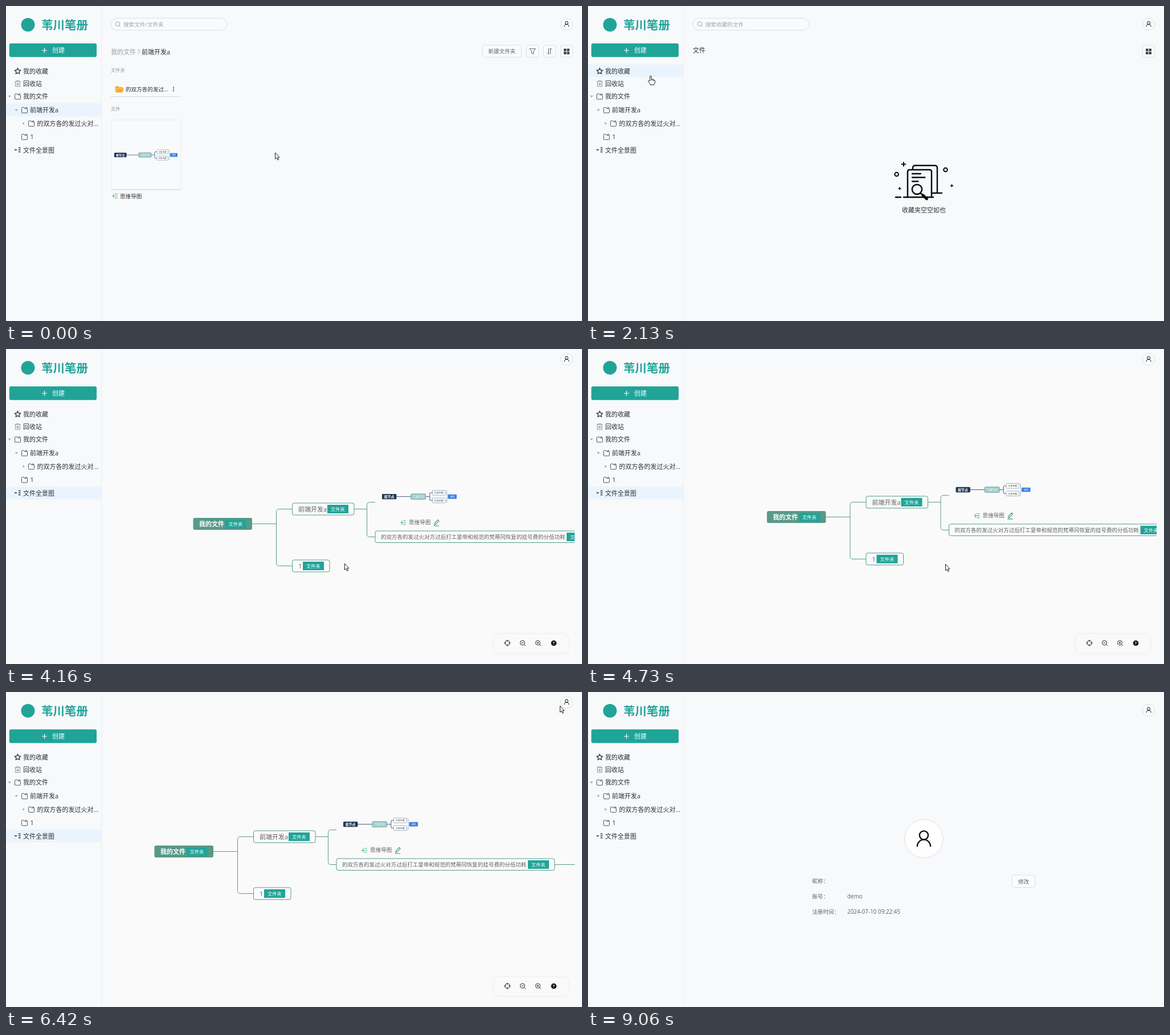
These frames come from a looping animation (1011 px wide and 554 px high, 9.72 s). An HTML page with a canvas:

```html
<!DOCTYPE html>
<html lang="zh-CN">
<head>
<meta charset="utf-8">
<title>文档管理</title>
<style>
html, body { margin: 0; width: 100%; height: 100%; overflow: hidden; background: #f7f9fb; }
canvas { display: block; width: 1011px; height: 554px; }
</style>
</head>
<body>
<canvas id="stage" width="1011" height="554"></canvas>
<script>
const g = document.getElementById('stage').getContext('2d');
const LOOP = 9720;
const BG = '#f7f9fb', TEAL = '#20a498', NODE = '#579a8a', INK = '#303133',
  MID = '#606266', PALE = '#9a9da3', EDGE = '#dcdfe6';
const FONT = '"Open Sans", "Noto Sans CJK SC", "Noto Sans CJK", sans-serif';

// Page switches
const BIN = 1230, FAV = 1990, MAP = 3370, PROFILE = 7490, LOAD = 140;

// Pointer path: time, x, y of the tip
const PATH = [
  [0, 472, 257.5], [400, 468, 255], [1080, 105, 145], [1490, 105, 145], [1710, 110, 123],
  [2440, 110, 123], [3040, 91, 244.5], [3520, 91, 244.5], [4300, 640, 389], [4670, 640, 389],
  [4730, 627, 378], [4850, 586, 367], [4990, 586, 367], [5540, 50, 161], [5710, 50, 161],
  [6250, 998, 2], [6420, 972, 24], [6670, 972, 24], [6780, 980, 17], [6930, 980, 17],
  [7320, 950, 55], [7850, 950, 55], [8120, 684, 210], [8420, 578, 262], [8800, 812, 244],
  [8920, 820, 247], [9060, 895, 495]
];
// Offset of the mind map while it is dragged
const DRAG = [[4670, 14, 12], [4730, 0, 0], [4850, -54, -15]];

const clamp = v => Math.max(0, Math.min(1, v));
const smooth = v => v * v * (3 - 2 * v);
const straight = v => v;

function along(keys, t, ease) {
  let i = 0;
  while (i < keys.length - 2 && t >= keys[i + 1][0]) i++;
  const [t0, x0, y0] = keys[i], [t1, x1, y1] = keys[i + 1];
  const k = ease(clamp((t - t0) / (t1 - t0)));
  return [x0 + (x1 - x0) * k, y0 + (y1 - y0) * k];
}

function text(s, x, cy, size = 11, color = INK, weight = 400) {
  g.font = `${weight} ${size}px ${FONT}`;
  g.fillStyle = color;
  g.fillText(s, x, cy + size * 0.38);
}

function paint(fill, stroke, lw = 1) {
  if (fill) { g.fillStyle = fill; g.fill(); }
  if (stroke) { g.strokeStyle = stroke; g.lineWidth = lw; g.stroke(); }
}

function box(x, y, w, h, r, fill, stroke, lw) {
  g.beginPath();
  g.roundRect(x, y, w, h, r);
  paint(fill, stroke, lw);
}

function disc(x, y, r, fill, stroke, lw) {
  g.beginPath();
  g.arc(x, y, r, 0, 7);
  paint(fill, stroke, lw);
}

function path(d, fill, stroke, lw, x = 0, y = 0) {
  g.save();
  g.translate(x, y);
  const p = new Path2D(d);
  if (fill) { g.fillStyle = fill; g.fill(p); }
  if (stroke) { g.strokeStyle = stroke; g.lineWidth = lw || 1; g.stroke(p); }
  g.restore();
}

const plus = (x, y, r, color, lw) => path(`M${-r} 0H${r}M0 ${-r}V${r}`, null, color, lw, x, y);
const folder = (x, y) =>
  path('M1.5 0H4.5L6 1.8H9Q10.5 1.8 10.5 3V8.5Q10.5 9.5 9.5 9.5H1.5Q.5 9.5 .5 8.5V1Q.5 0 1.5 0ZM6 1.8L7.5 0H9.5L10.3 2', null, '#4c5561', 1, x, y);
const treeIcon = (x, y) =>
  path('M0 0H10M5 -3.5H10M5 3.5H10M3.5 -3.5Q2.5 -3.5 2.5 0Q2.5 3.5 3.5 3.5', null, '#4cb97c', 1.1, x, y);

function person(x, y, k, lw) {
  disc(x, y - 6 * k, 7.6 * k, null, '#111', lw);
  g.beginPath();
  g.ellipse(x, y + 14 * k, 11.7 * k, 12.4 * k, 0, Math.PI, 2 * Math.PI);
  paint(null, '#111', lw);
}

function userButton(y) {
  disc(984, y, 10.5, '#fafbfc', EDGE);
  person(984, y - 0.3, 0.34, 1);
}

function sidebar(active) {
  path('M167.5 0V554', null, '#eceef1');
  disc(38.5, 33, 12, TEAL);
  text('苇川笔册', 62, 33.5, 20.5, TEAL, 700);
  box(5.8, 65.7, 153.3, 24.1, 3, TEAL);
  plus(67.5, 78, 4.5, '#fff', 1.2);
  text('创建', 81, 78, 11, '#fff');
  if (active) {
    g.fillStyle = '#e9f4fe';
    g.fillRect(0, active[0], 167, active[1]);
  }
  g.beginPath();
  for (let i = 0; i < 10; i++) {
    const r = i % 2 ? 2.7 : 5.4, a = (i / 5 - 0.5) * Math.PI;
    g.lineTo(20.5 + r * Math.cos(a), 114.8 + r * Math.sin(a));
  }
  g.closePath();
  paint(null, '#222', 1.2);
  path('M0 2H11M3 2V.5H8V2M1.5 2V10.5H9.5V2M4 4.5V8.5M5.5 4.5V8.5M7 4.5V8.5', null, '#8d9aa8', 1, 15, 131);
  folder(15, 154.5);
  folder(27, 178.5);
  folder(39, 202);
  folder(27, 225.5);
  path('M15 253H19M22 249.5H25.5M22 253H25.5M22 256.5H25.5', null, '#222', 1.6);
  path('M3.5 157.5H9L6.2 161ZM15.5 181.5H21L18.2 185ZM29.5 204L33 206.5L29.5 209Z', '#a8abb2');
  text('我的收藏', 30, 115);
  text('回收站', 30, 137);
  text('我的文件', 30, 159);
  text('前端开发a', 42, 183);
  text('的双方各的发过火对...', 54.5, 207);
  text('1', 42.5, 230);
  text('文件全景图', 30, 253.5);
}

function search(hint) {
  box(184.5, 21.5, 203, 21, 10.5, '#fafbfc', EDGE);
  disc(196, 31.5, 3.8, null, PALE);
  path('M198.8 34.5L200.5 36.2', null, PALE);
  text(hint, 206, 32, 9.6, '#a0a3a9');
}

function button(x, w) {
  box(x + 0.5, 69, w - 1, 21, 3, '#fafbfc', EDGE);
}

function gridButton() {
  button(973, 22);
  for (const x of [979, 984.5]) for (const y of [75, 80.5]) box(x, y, 4.5, 4.5, 0.5, '#444');
}

// Small mind map, its root at the left of (x, y)
function miniMap(x, y, k) {
  g.save();
  g.translate(x, y);
  g.scale(k, k);
  path('M21 0H43M65 0H71M75 -5.7H72Q71 -5.7 71 -4.7V4.7Q71 5.7 72 5.7H75', null, '#3f5872', 0.8);
  path('M95 -9Q96.5 -9 96.5 -7V-2L98 0L96.5 2V7Q96.5 9 95 9', null, '#7f9ccc', 0.7);
  box(0, -4, 21.5, 8, 1.2, '#1f3756');
  text('根节点', 3, 0, 5.1, '#fff', 700);
  box(43, -4, 22, 8, 1.2, '#a6d0d0', '#6f9a9c', 0.8);
  text('二级节点', 46, 0, 4, '#e9f6f6');
  for (const cy of [-5.7, 5.7]) {
    box(75, cy - 3.6, 19, 7.2, 1, '#fff', '#8fa3bd', 0.7);
    text('分支主题', 78, cy, 3.3, '#333');
  }
  box(98, -3.2, 13, 6.4, 0.8, '#3b7fe6');
  text('概要', 101.5, 0, 3.2, '#fff');
  g.restore();
}

function home() {
  search('搜索文件/文件夹');
  text('我的文件', 184, 80.5, 11, PALE);
  path('M231 76L235 80L231 84', null, PALE);
  text('前端开发a', 238, 80.5);
  button(836, 69);
  text('新建文件夹', 846.5, 79.5, 9.6, MID);
  button(913, 22);
  path('M919 75H929.5L925.8 79.5V84.5L922.5 82.8V79.5Z', null, MID);
  button(943, 22);
  path('M952.5 74V85L949.5 82M955.5 85V74L958.5 77', null, MID);
  gridButton();
  userButton(32);
  text('文件夹', 184, 112.5, 8.3, PALE);
  path('M184 159.5H306', null, '#d3d6da');
  path('M192 142.5Q192 141 193.5 141H197L198.5 142.5H203.5Q205 142.5 205 144H206.5L205 151Q205 152 203.5 152H193.5Q192 152 192 150.5Z', '#fba92c');
  path('M193 150L195.2 144.7H206', null, '#ffd590', 0.9);
  text('的双方各的发过...', 210, 146.5, 9.6);
  for (const y of [143, 146.2, 149.4]) disc(294, y, 0.95, '#333');
  text('文件', 184, 180.5, 8.3, PALE);
  box(184.5, 200.5, 122, 122.5, 2, '#f9fafb', '#e9ebee');
  path('M185 323H306', null, '#d0d3d7');
  miniMap(190, 262, 1);
  treeIcon(186, 334);
  text('思维导图', 200, 334, 9.6);
}

function emptyArt() {
  g.lineCap = 'round';
  const k = '#0b0b0b';
  plus(554, 278.3, 3.3, k, 2);
  plus(547, 321, 2, k, 1.5);
  plus(638.5, 316, 2, k, 1.5);
  disc(541.7, 296, 3.3, null, k, 2);
  disc(627.5, 288, 3.3, null, k, 2);
  path('M570 287V285Q570 280.5 574.5 280.5H608.5Q613 280.5 613 285V329M605 329H621', null, k, 2.4);
  path('M561 336V291.5Q561 288 564.5 288H599.5Q603 288 603 291.5V336M540 336.3H549M554 336.3H606', null, k, 2.5);
  path('M569 295H584M569 301.5H591.5M569 308.5H579.5', null, k, 2.3);
  disc(577.5, 322.5, 8.6, BG, k, 2.5);
  path('M584 329.5L587 332', null, k, 2.5);
  path('M588 333L594.5 339', null, k, 5);
  g.lineCap = 'butt';
}

function emptyPage(hint, note, loaded) {
  search(hint);
  text('文件', 184, 77.5);
  gridButton();
  userButton(32);
  if (!loaded) return;
  emptyArt();
  text(note, 551, 358.5);
}

function tag(x, y) {
  g.fillStyle = TEAL;
  g.fillRect(x, y - 7.5, 37, 15);
  text('文件夹', x + 6, y, 8.3, '#fff');
}

function mindMap([dx, dy]) {
  g.save();
  g.fillStyle = '#fafafa';
  g.beginPath();
  g.rect(181, 38, 817, 507);
  g.fill();
  g.clip();
  g.translate(dx, dy);
  path('M418 295.5H460.5M488 269.5H465.5Q460.5 269.5 460.5 274.5V364.5Q460.5 369.5 465.5 369.5H488', null, NODE);
  path('M597 269.5H619.5M634 257.5H624.5Q619.5 257.5 619.5 262.5V313.5Q619.5 318.5 624.5 318.5H634M1017 318.5H1090', null, NODE);
  box(314.5, 285, 103.5, 21, 3, NODE);
  text('我的文件', 325, 296, 11, '#fff', 700);
  tag(370.5, 296);
  box(488.5, 259, 108.5, 21, 3, '#fbfbfb', NODE);
  text('前端开发a', 499, 270, 11, MID);
  tag(550, 269.5);
  box(488.5, 359, 65.5, 21, 3, '#fbfbfb', NODE);
  text('1', 499, 370, 11, MID);
  tag(507, 369.5);
  box(634, 308, 383, 20.5, 3, '#fbfbfb', NODE);
  text('的双方各的发过火对方过后打工皇帝和规范的梵蒂冈恢复的挂号费的分低功耗', 644, 318.5, 9.53, MID);
  tag(970, 318.5);
  miniMap(646, 247.6, 1.18);
  treeIcon(678, 293.5);
  text('思维导图', 693, 292.5, 9.6, MID);
  path('M738 297L739 293.5L744 288.5L746 290.5L741 295.8ZM737 299H746', null, '#3c8f80', 1.1);
  g.restore();
}

function zoomBar(raised) {
  if (raised) {
    g.save();
    g.shadowColor = 'rgba(0,0,0,.07)';
    g.shadowBlur = 6;
    box(857, 502, 129, 32, 7, '#fafafa');
    g.restore();
  } else {
    path('M866 531.5H977', null, '#e4e6e9');
  }
  const k = '#222';
  disc(880, 517, 4.3, null, k);
  path('M880 511.5V515M880 519V522.5M874.5 517H878M882 517H885.5', null, k);
  for (const x of [907, 934]) {
    disc(x - 0.5, 516.7, 4, null, k);
    path('M-2.3 0H1.3M2.5 3L5 5.3', null, k, 1, x, 516.7);
  }
  path('M933.5 514.9V518.5', null, k);
  disc(961.5, 517.3, 4.8, '#111');
  text('?', 959.6, 517.3, 7.5, '#fff', 700);
}

function menu(alpha, hover) {
  if (alpha <= 0) return;
  g.save();
  g.globalAlpha = alpha;
  g.shadowColor = 'rgba(0,0,0,.1)';
  g.shadowBlur = 5;
  box(915, 41, 78, 98, 3, '#fff');
  g.shadowBlur = 0;
  if (hover) {
    g.fillStyle = '#e8f6f5';
    g.fillRect(915, 46, 78, 29);
  }
  ['个人中心', '修改密码', '退出登录'].forEach((s, i) =>
    text(s, 934, 60.5 + i * 29, 9.8, hover && !i ? TEAL : MID));
  g.restore();
}

function profile(t) {
  userButton(32);
  disc(589.5, 258, 33.7, t > 8330 ? '#fefefe' : BG, EDGE);
  person(589.5, 258, 1, 2.4);
  text('昵称：', 393.5, 332.5, 9.6, MID);
  text('账号：', 393.5, 359.5, 9.6, MID);
  text('注册时间：', 393.5, 386.5, 9.6, MID);
  text('demo', 455, 359.5, 9.87, MID);
  text('2024-07-10 09:22:45', 455, 386.5, 9.87, MID);
  box(744.5, 322, 40, 21.5, 3, '#fafbfc', EDGE);
  text('修改', 755, 333, 9.6, MID);
}

function pointer(t) {
  if ((t >= 250 && t < 400) || t >= 9050) return;
  const [x, y] = along(PATH, t, smooth);
  const onMap = t >= MAP && t < PROFILE;
  const hand = (x < 167 && y > 60) ||
    (onMap && Math.hypot(x - 984, y - 18) < 10) ||
    (t > 7000 && t < PROFILE && x > 915 && y > 41) ||
    (t > PROFILE && Math.hypot(x - 589.5, y - 258) < 34);
  g.lineJoin = 'round';
  if (hand) {
    path('M-1.3 9V1Q-1.3 0 0 0Q1.3 0 1.3 1V5.5Q3.4 5 3.7 6.4Q5.6 6 5.9 7.2Q7.6 7 7.6 8.6V11Q7.4 13 6.2 14.2V15.7H-.8V14.3L-4.2 9.7Q-4.6 8.2 -3.3 8.2ZM1.3 5.5V8.2M3.7 6.4V8.6M5.9 7.2V9',
      '#fff', '#222', 1, x, y);
  } else {
    path('M.5 .5V11.6L3 9.4L4.8 13.4L6.6 12.6L4.9 8.7H8Z', '#fff', '#222', 1, x, y);
  }
  g.lineJoin = 'miter';
}

function activeRow(t) {
  if (t < BIN) return [171, 23];
  if (t < FAV) return [126, 22];
  if (t < MAP) return [103, 22];
  return t < PROFILE ? [242, 22] : null;
}

function draw(t) {
  g.fillStyle = BG;
  g.fillRect(0, 0, 1011, 554);
  sidebar(activeRow(t));
  if (t < BIN) home();
  else if (t < FAV) emptyPage('搜索回收站的文件', '回收站空空如也', t >= BIN + LOAD);
  else if (t < MAP) emptyPage('搜索收藏的文件', '收藏夹空空如也', t >= FAV + LOAD);
  else if (t < PROFILE) {
    const ready = t >= 3520;
    if (ready) mindMap(along(DRAG, t, straight));
    userButton(18);
    zoomBar(ready);
  } else profile(t);
  menu(t < PROFILE ? clamp((t - 6930) / 170) : 1 - clamp((t - PROFILE) / 150), t > 7150);
  pointer(t);
}

function frame(now) {
  draw(now % LOOP);
  requestAnimationFrame(frame);
}
draw(0);
requestAnimationFrame(frame);
</script>
</body>
</html>
```
